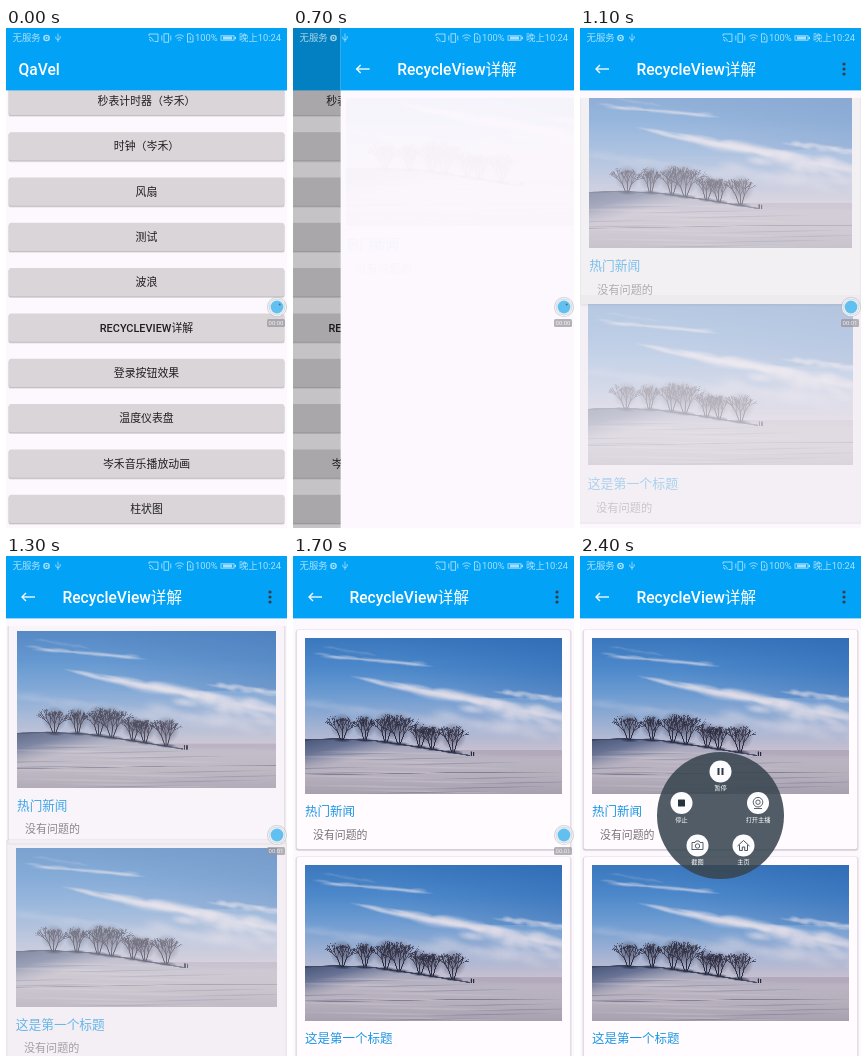
Recreate the animation shown at these times as an HTML page with a canvas. Size 281 px wide and 500 px high, loop 3100 ms.

```html
<!DOCTYPE html>
<html lang="zh-CN">
<head>
<meta charset="utf-8">
<style>
html, body { margin: 0; width: 100%; height: 100%; overflow: hidden; background: #fcf8fd; }
canvas { display: block; width: 100vw; height: 100vh; }
</style>
</head>
<body>
<canvas id="stage"></canvas>
<script>
const W = 281, H = 500, LOOP = 3100, STEP = 100, BAR = 62.4;
const BLUE = '#02a3f6', PAGE = '#fcf8fd';
const FONT = 'Roboto, "Noto Sans CJK SC", "Noto Sans CJK", sans-serif';
const LABELS = ['秒表计时器（岑禾）', '时钟（岑禾）', '风扇', '测试', '波浪',
  'RECYCLEVIEW详解', '登录按钮效果', '温度仪表盘', '岑禾音乐播放动画', '柱状图'];

const canvas = document.getElementById('stage');
const screen = canvas.getContext('2d');
let c = screen;

const clamp = v => Math.min(1, Math.max(0, v));
const progress = (t, start, length) => clamp((t - start) / length);
const smooth = p => (1 - Math.cos(Math.PI * p)) / 2;

function rect(x, y, w, h, fill) {
  c.fillStyle = fill;
  c.fillRect(x, y, w, h);
}

function round(x, y, w, h, r, fill) {
  c.fillStyle = fill;
  c.beginPath();
  c.roundRect(x, y, w, h, r);
  c.fill();
}

function disc(x, y, r, fill) {
  c.fillStyle = fill;
  c.beginPath();
  c.arc(x, y, r, 0, 7);
  c.fill();
}

function ring(x, y, r, stroke, width = 1, from = 0, to = 2 * Math.PI) {
  c.strokeStyle = stroke;
  c.lineWidth = width;
  c.beginPath();
  c.arc(x, y, r, from, to);
  c.stroke();
}

function line(points, stroke, width = 1) {
  c.strokeStyle = stroke;
  c.lineWidth = width;
  c.beginPath();
  for (let i = 0; i < points.length; i += 2) c.lineTo(points[i], points[i + 1]);
  c.stroke();
}

function text(s, x, y, size, fill, weight = 400, align = 'left') {
  c.font = `${weight} ${size}px ${FONT}`;
  c.fillStyle = fill;
  c.textAlign = align;
  c.textBaseline = 'alphabetic';
  c.fillText(s, x, y);
}

function clipped(x, y, w, h, draw) {
  c.save();
  c.beginPath();
  c.rect(x, y, w, h);
  c.clip();
  draw();
  c.restore();
}

function seeded(seed) {
  return () => (seed = seed * 16807 % 2147483647) / 2147483647;
}

// Winter landscape, 257 x 156
function gradient(x0, y0, x1, y1, ...colors) {
  const g = c.createLinearGradient(x0, y0, x1, y1);
  colors.forEach((col, i) => g.addColorStop(i / (colors.length - 1), col));
  return g;
}

// Ellipse that fades out towards its rim; rgb is "r,g,b"
function soft(x, y, rx, ry, angle, rgb, alpha) {
  c.save();
  c.translate(x, y);
  c.rotate(angle);
  c.scale(rx, ry);
  const g = c.createRadialGradient(0, 0, 0, 0, 0, 1);
  g.addColorStop(0, `rgba(${rgb},${alpha})`);
  g.addColorStop(0.5, `rgba(${rgb},${alpha * 0.6})`);
  g.addColorStop(1, `rgba(${rgb},0)`);
  disc(0, 0, 1, g);
  c.restore();
}

function cloud(x0, y0, x1, y1, thick, alpha, rnd) {
  const dx = x1 - x0, dy = y1 - y0, angle = Math.atan2(dy, dx);
  for (let i = 0; i < 22; i++) {
    const p = (i + rnd()) / 22;
    soft(x0 + dx * p, y0 + dy * p + (rnd() - 0.5) * thick * 0.7,
      dx * (0.08 + 0.08 * rnd()), thick * (0.3 + 0.4 * rnd()),
      angle + (rnd() - 0.5) * 0.05, '244,232,236', alpha);
  }
}

function branch(x, y, angle, length, depth, rnd) {
  const x2 = x + Math.cos(angle) * length, y2 = y + Math.sin(angle) * length;
  line([x, y, x2, y2], depth > 2 ? '#292b40' : 'rgba(48,46,64,.75)', 0.4 + depth * 0.2);
  if (!depth) return;
  for (let i = -1; i <= 1; i++)
    branch(x2, y2, angle + i * 0.4 + (rnd() - 0.5) * 0.4, length * (0.6 + 0.25 * rnd()), depth - 1, rnd);
}

function tree(x, base, h, rnd) {
  soft(x, base - h * 0.58, h * 0.5, h * 0.52, 0, '56,54,76', 0.6);
  for (let i = -1; i <= 1; i++)
    branch(x + i * 1.2, base, -Math.PI / 2 + i * 0.3 + (rnd() - 0.5) * 0.15, h * 0.35, 3, rnd);
  soft(x, base, h * 0.4, 2.5, 0.06, '36,42,66', 0.8);
}

function makePhoto() {
  const photo = document.createElement('canvas');
  photo.width = 257 * 3;
  photo.height = 156 * 3;
  c = photo.getContext('2d');
  c.scale(3, 3);
  const rnd = seeded(77);
  rect(0, 0, 257, 120, gradient(0, 0, 0, 120, '#3b77bd', '#4c88ca', '#729ed2', '#a3b3d3', '#d3c4cf'));
  rect(0, 0, 257, 60, gradient(257, 0, 90, 50, 'rgba(32,92,170,.35)', 'rgba(32,92,170,0)'));
  cloud(17, 17, 122, 27, 4, 0.28, rnd);
  cloud(20, 9, 70, 17, 3, 0.06, rnd);
  cloud(58, 41, 175, 63, 6, 0.32, rnd);
  cloud(90, 48, 250, 76, 10, 0.36, rnd);
  cloud(160, 66, 270, 84, 14, 0.3, rnd);
  cloud(196, 53, 270, 64, 6, 0.3, rnd);
  cloud(120, 80, 270, 98, 18, 0.16, rnd);
  cloud(0, 66, 120, 80, 10, 0.08, rnd);

  rect(0, 112, 257, 6, 'rgba(150,140,165,.45)');
  c.fillStyle = gradient(0, 104, 0, 156, '#a2a4bb', '#bab4c2', '#b5aebb', '#a6a0af');
  c.beginPath();
  c.moveTo(0, 101.5);
  c.bezierCurveTo(45, 98, 90, 105, 135, 114);
  c.bezierCurveTo(170, 119, 220, 117, 257, 118);
  c.lineTo(257, 156);
  c.lineTo(0, 156);
  c.fill();
  // Shaded side of the hill
  c.fillStyle = gradient(0, 100, 8, 132, '#465577', 'rgba(82,96,134,.75)', 'rgba(120,128,158,0)');
  c.beginPath();
  c.moveTo(0, 101.5);
  c.bezierCurveTo(45, 98, 90, 105, 170, 118);
  c.lineTo(60, 132);
  c.lineTo(0, 134);
  c.fill();
  line([0, 102, 30, 100.8, 70, 102.7, 110, 108.5, 165, 117.5], '#3d4866', 1.3);
  for (let i = 0; i < 9; i++) {
    const y = 110 + i * 4.8;
    soft(50 + rnd() * 110, y + 5, 90, 1.4, 0.02, '214,204,214', 0.4);
    soft(rnd() * 230, y + 6, 70, 0.9, -0.02, '92,98,130', 0.4);
  }
  line([0, 137, 70, 136, 150, 134.5, 257, 134], 'rgba(95,96,122,.6)', 0.7);
  [[37, 102, 25], [60, 102, 24], [81, 104, 28], [94, 106, 29], [115, 109, 23], [127, 111, 23], [148, 114, 27]]
    .forEach(([x, base, h]) => tree(x, base, h, rnd));
  rect(165.6, 113.5, 1.4, 4.5, '#262a40');
  rect(168, 113.8, 1.4, 4.2, '#262a40');
  c = screen;
  return photo;
}

function drawStatus() {
  const ink = 'rgba(255,255,255,.66)';
  text('无服务', 6.5, 13.3, 9.4, ink);
  ring(40.5, 10, 2.6, ink, 1.4);
  disc(40.5, 10, 1, ink);
  line([52, 5.5, 52, 14], ink, 0.8);
  line([49.8, 8.5, 49.8, 10.5, 52, 12, 54.2, 10.5, 54.2, 8], ink, 0.8);
  line([143, 8, 143, 6, 152, 6, 152, 13.5, 148.5, 13.5], ink, 0.9);
  ring(143, 13.5, 2, ink, 0.9, -Math.PI / 2, 0);
  ring(143, 13.5, 4.2, ink, 0.9, -Math.PI / 2, 0);
  c.strokeRect(158, 5.8, 4.6, 8.4);
  line([155.8, 7.5, 155.8, 12.5], ink, 0.9);
  line([164.8, 7.5, 164.8, 12.5], ink, 0.9);
  [2, 4.5, 7].forEach(r => ring(173.5, 14, r, ink, 0.9, -2.25, -0.9));
  line([181.5, 14, 181.5, 5.8, 185, 5.8, 187, 8, 187, 14, 181.2, 14], ink, 0.9);
  line([184.3, 8.5, 184.3, 12], ink, 0.9);
  text('100%', 189, 13.3, 9.4, ink);
  c.strokeRect(215, 7.8, 13, 4.4);
  rect(217, 8.5, 9, 3, ink);
  rect(228.5, 8.8, 1.5, 2.4, ink);
  text('晚上10:24', 233, 13.3, 9.4, ink);
}

function drawList() {
  rect(0, 0, W, H, PAGE);
  LABELS.forEach((label, i) => {
    const y = 73 + i * 45.33;
    round(2.3, y - 13, 276.4, 28.8, 2, 'rgba(0,0,0,.1)');
    round(2.7, y - 13.6, 275.6, 28.6, 2, 'rgba(0,0,0,.14)');
    round(3, y - 14.2, 275, 28.2, 2, '#d9d5d9');
    text(label, W / 2, y + 4, 10.9, '#1f1d20', 500, 'center');
  });
  rect(0, 0, W, BAR, BLUE);
  text('QaVel', 12.5, 46.5, 15.6, '#fff', 500);
}

function drawCard(index, title, t) {
  const p = smooth(progress(t, 590 + 142 * index, 950));
  if (!p) return;
  const left = 1 - p, scale = 1 + 0.05 * left;
  c.save();
  c.globalAlpha = p;
  c.translate(W / 2, 184 + 227 * index - 44 * left);
  c.scale(scale, scale);
  c.translate(-W / 2, -110);
  for (let i = 1; i < 4; i++) {
    const grow = i * 0.5;
    round(3.7 - grow, 0.8 - grow, 273.6 + 2 * grow, 219 + 2 * grow, 2 + grow, 'rgba(0,0,0,.06)');
  }
  round(3.7, 0, 273.6, 219, 2, '#fffbff');
  c.drawImage(photo, 12, 8, 257, 156);
  text(title, 12, 185.8, 12.5, '#1c98e3');
  text('没有问题的', 20, 209, 10.9, '#767378');
  c.restore();
}

function drawDetail(t) {
  rect(0, 0, W, H, PAGE);
  clipped(0, 70, W, H - 70, () => {
    drawCard(0, '热门新闻', t);
    drawCard(1, '这是第一个标题', t);
  });
  rect(0, 0, W, BAR, BLUE);
  line([29, 41, 16, 41], '#fff', 1.3);
  line([20, 37, 16, 41, 20, 45], '#fff', 1.3);
  text('RecycleView详解', 56.5, 46.5, 15.6, '#fff', 500);
  [36, 41, 46].forEach(y => disc(264, y, 1.6, '#3c3b45'));
}

function drawBall(t) {
  disc(271, 279, 10, 'rgba(165,173,182,.55)');
  disc(271, 279, 9.2, '#f1f3f6');
  ring(271, 279, 7.8, '#cfd6dc', 0.8);
  disc(271, 279, 6.4, '#62c0f0');
  if (t < 800) disc(273.7, 276.6, 1, '#4a6f8c');
  round(261, 291, 18, 8, 1.5, 'rgba(150,148,154,.7)');
  text('00:0' + Math.floor(t / 1000), 270, 297.2, 6, '#f4f2f5', 400, 'center');
}

const MENU = [
  ['暂停', 140.5, 215.5, () => {
    rect(-3, -3.5, 2, 7, '#2d3944');
    rect(1, -3.5, 2, 7, '#2d3944');
  }],
  ['停止', 101.5, 247, () => round(-3.5, -3.5, 7, 7, 0.6, '#26323c')],
  ['打开主播', 178, 247, () => {
    ring(0, -0.8, 4.8, '#48535c', 0.9);
    ring(0, -0.8, 2.2, '#48535c', 0.9);
    line([-4, 5.5, 4, 5.5], '#48535c', 0.9);
  }],
  ['截图', 117.5, 289.5, () => {
    line([-5.5, 4, -5.5, -3, -2.5, -3, -1.5, -4.5, 1.5, -4.5, 2.5, -3, 5.5, -3, 5.5, 4, -5.9, 4], '#48535c', 0.9);
    ring(0, 0.5, 2.2, '#48535c', 0.9);
  }],
  ['主页', 163.5, 289.5, () => {
    line([-6, 0.5, 0, -5, 6, 0.5], '#48535c', 1);
    line([-4, -0.5, -4, 5, -1.2, 5, -1.2, 1.5, 1.2, 1.5, 1.2, 5, 4, 5, 4, -0.5], '#48535c', 1);
  }]
];

function drawMenu(p) {
  const scale = 0.3 + 0.7 * p;
  c.save();
  c.globalAlpha = p;
  c.translate(140.5, 259.5);
  c.scale(scale, scale);
  c.translate(-140.5, -259.5);
  disc(140.5, 259.5, 63.5, 'rgba(56,70,80,.87)');
  for (const [label, x, y, icon] of MENU) {
    disc(x, y, 11, '#fdfcfe');
    c.save();
    c.translate(x, y);
    icon();
    c.restore();
    text(label, x, y + 18.8, 6.2, '#fff', 400, 'center');
  }
  c.restore();
}

function draw(t) {
  const slide = W * (1 - progress(t, 500, 340)) ** 2;
  if (slide > 0) {
    const shown = 1 - slide / W;
    c.save();
    c.translate(-W / 4 * shown, 0);
    drawList();
    c.restore();
    rect(0, 0, W, H, `rgba(0,0,0,${0.26 * shown})`);
  }
  if (slide < W) {
    c.save();
    c.translate(slide, 0);
    drawDetail(t);
    c.restore();
  }
  drawStatus();
  if (t < 2000) drawBall(t);
  else drawMenu(1 - (1 - progress(t, 1900, 500)) ** 2);
}

const photo = makePhoto();

function frame() {
  const ratio = window.devicePixelRatio || 1;
  const w = Math.round(innerWidth * ratio), h = Math.round(innerHeight * ratio);
  if (canvas.width !== w || canvas.height !== h) {
    canvas.width = w;
    canvas.height = h;
  }
  c.setTransform(w / W, 0, 0, h / H, 0, 0);
  draw(Math.floor((performance.now() % LOOP + 2) / STEP) * STEP % LOOP);
  requestAnimationFrame(frame);
}
frame();
</script>
</body>
</html>
```
